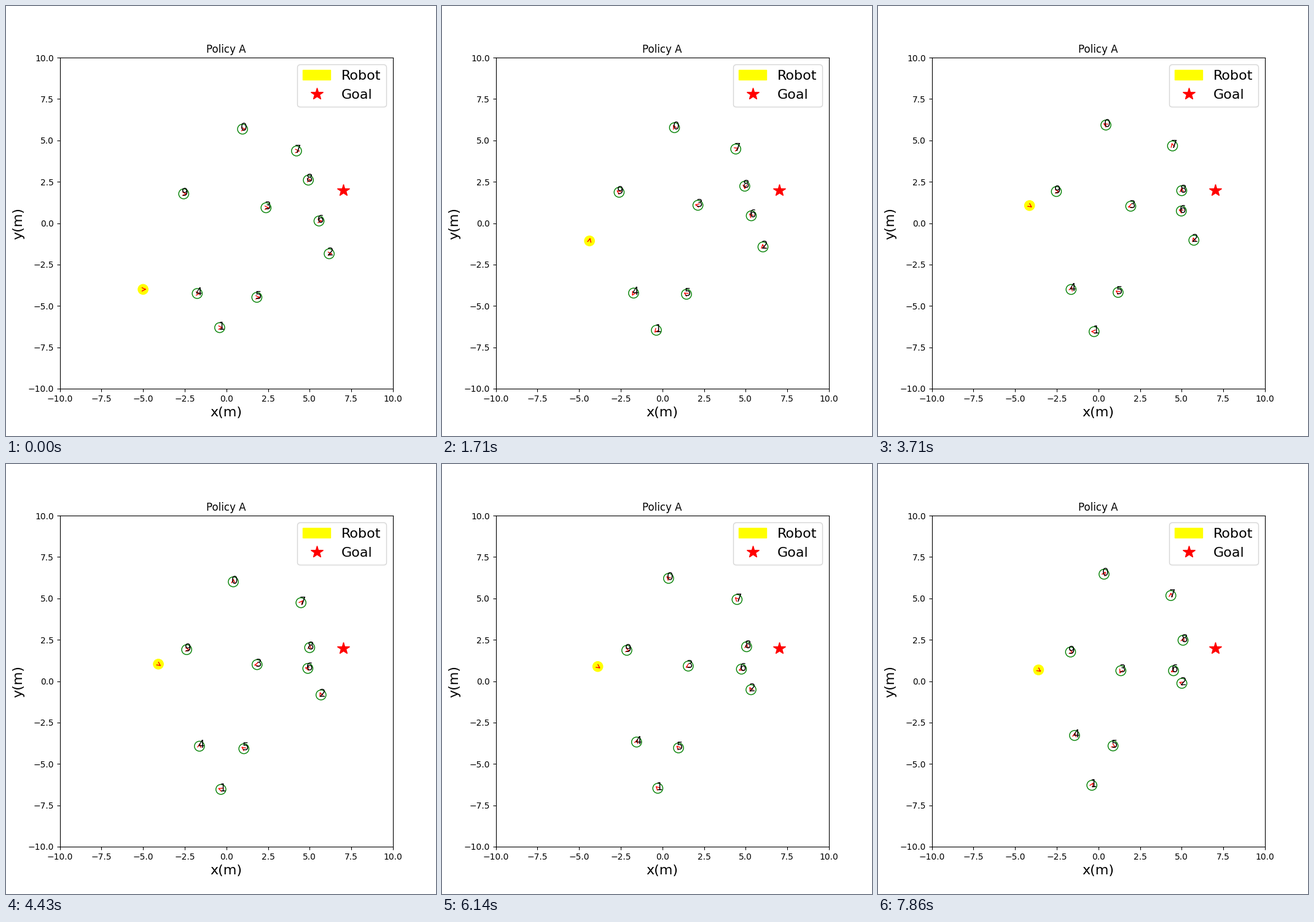
Animation, 700 px wide and 700 px high, one loop 8 s. Source, as a matplotlib script:

```python
import numpy as np
import matplotlib.pyplot as plt
from matplotlib.animation import FuncAnimation
from matplotlib.patches import ArrowStyle, Circle, FancyArrowPatch

LOOP_MS = 8000
TICK_MS = 40
STEPS = 56          # the simulation advances in 56 visible steps
RADIUS = 0.3
LABEL_OFFSET = 0.11

# Positions are complex numbers x + yj: start, middle and end of each walk.
WALKS = [
    (0.97 + 5.68j, 0.48 + 5.95j, 0.34 + 6.46j),
    (-0.40 - 6.31j, -0.28 - 6.55j, -0.39 - 6.29j),
    (6.17 - 1.85j, 5.72 - 0.97j, 5.01 - 0.13j),
    (2.38 + 0.93j, 1.88 + 1.05j, 1.35 + 0.63j),
    (-1.75 - 4.25j, -1.65 - 4.02j, -1.43 - 3.28j),
    (1.83 - 4.48j, 1.14 - 4.15j, 0.88 - 3.91j),
    (5.56 + 0.13j, 4.99 + 0.72j, 4.51 + 0.63j),
    (4.21 + 4.36j, 4.50 + 4.68j, 4.35 + 5.17j),
    (4.92 + 2.60j, 5.00 + 1.98j, 5.08 + 2.47j),
    (-2.56 + 1.77j, -2.48 + 1.91j, -1.67 + 1.76j),
]

rng = np.random.default_rng(4)
fig, ax = plt.subplots(figsize=(7, 7), dpi=100)
ax.set_xlim(-10, 10)
ax.set_ylim(-10, 10)
ax.set_title("Policy A", fontsize=12)
ax.set_xlabel("x(m)", fontsize=16)
ax.set_ylabel("y(m)", fontsize=16)


def stroll(start, middle, end):
    """Curve through three points with a slight wander on top."""
    u = np.linspace(0, 1, STEPS)
    bow = middle - (start + end) / 2
    waves = rng.integers(3, 7)
    sway = 0.05 * np.exp(2j * np.pi * rng.random())
    return (start + (end - start) * u + 4 * bow * u * (1 - u)
            + sway * np.sin(np.pi * waves * u))


def drive():
    """Straight run at constant speed, a brake, then a slow creep."""
    k = np.arange(STEPS)
    stop = 24
    run = np.interp(k, [0, 18, 21, stop],
                    [-5 - 4j, -4.06 + 0.39j, -4.08 + 1.02j, -4.14 + 1.07j])
    creep = np.clip((k - stop) / (STEPS - 1 - stop), 0, 1) ** 1.5
    return run + (0.55 - 0.39j) * creep


class Agent:
    def __init__(self, path, label="", **style):
        self.path = path
        self.heading = np.angle(np.diff(path, prepend=path[0]))
        self.body = ax.add_patch(Circle((0, 0), RADIUS, **style))
        self.arrow = ax.add_patch(FancyArrowPatch(
            (0, 0), (RADIUS, 0), color="red",
            arrowstyle=ArrowStyle("->", head_length=4, head_width=2)))
        self.text = ax.text(0, 0, label, color="black", fontsize=12)

    def move(self, step):
        p = self.path[step]
        tip = p + RADIUS * np.exp(1j * self.heading[step])
        self.body.center = (p.real, p.imag)
        self.arrow.set_positions((p.real, p.imag), (tip.real, tip.imag))
        self.text.set_position((p.real - LABEL_OFFSET, p.imag - LABEL_OFFSET))


robot = Agent(drive(), color="yellow")
people = [Agent(stroll(*walk), str(i), fill=False, color="g")
          for i, walk in enumerate(WALKS)]

goal, = ax.plot([7], [2], color="red", marker="*", linestyle="None",
                markersize=15)
ax.legend([robot.body, goal], ["Robot", "Goal"], fontsize=16,
          loc="upper right")


def draw(tick):
    # Show the step that has been reached by the end of this tick.
    step = min((tick + 1) * TICK_MS * STEPS // LOOP_MS, STEPS - 1)
    for agent in [robot, *people]:
        agent.move(step)
    return []


anim = FuncAnimation(fig, draw, frames=LOOP_MS // TICK_MS,
                     init_func=lambda: draw(0), interval=TICK_MS,
                     repeat=True, repeat_delay=0)
plt.show()
```
